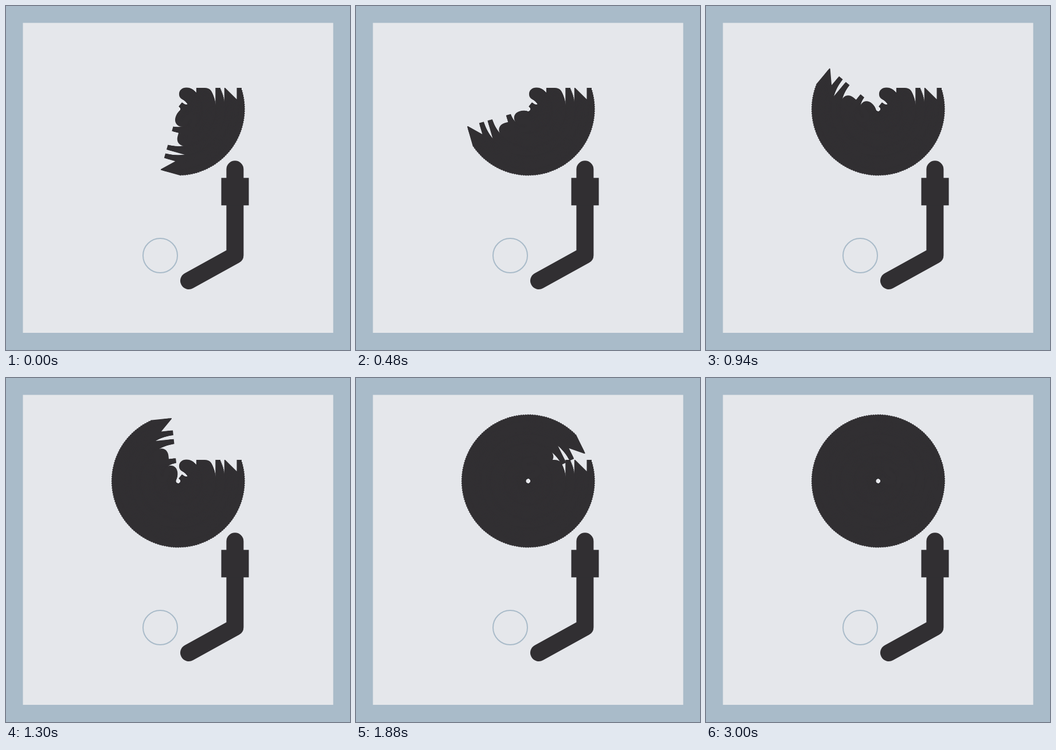
An HTML page with a canvas that plays this animation: 600 px wide and 601 px high, repeating every 3.3 s.

```html
<!DOCTYPE html>
<html lang="en">
<head>
<meta charset="utf-8">
<title>Spin</title>
<style>
  html, body { margin: 0; width: 100%; height: 100%; overflow: hidden; background: #a9bbc9; }
  canvas { display: block; }
</style>
</head>
<body>
<canvas id="stage" width="600" height="601"></canvas>
<script>
const ctx = document.getElementById('stage').getContext('2d');
const LOOP = 3300;
const BLUE = '#a9bbc9', PANEL = '#e5e7eb', INK = '#312f32';
const TICK = 30.3;            // ms between visible updates
const STEP = Math.PI / 90;    // angle between printed copies
const FIRST_COPIES = 53;

// The word SPIN, with its pivot at the left end of the baseline.
const word = new Path2D([
  'M1 -4.5L6.4 -11.6C9.5 -9 12 -7.9 15 -7.9C17.6 -7.9 19.2 -9 19.2 -10.8',
  'C19.2 -12.9 17.7 -13.7 12.8 -15C6.5 -16.7 1.6 -19 1.6 -26',
  'C1.6 -33 7 -37.5 14.3 -37.5C19 -37.5 23.2 -36 26.5 -33.3',
  'L21.6 -26.4C18.8 -28.4 16.3 -29.4 14 -29.4C11.6 -29.4 10.4 -28.3 10.4 -26.8',
  'C10.4 -24.6 12 -23.9 17.2 -22.6C24.2 -20.8 28.3 -17.8 28.3 -11.6',
  'C28.3 -4 22.8 .5 15 .5C9.7 .5 4.7 -1.2 1 -4.5Z',
  'M31.6 0V-37H46.5C54.8 -37 59.5 -32 59.5 -24.8C59.5 -16.6 53.4 -12.2 45.8 -12.2H40V0Z',
  'M40 -19.5V-29.5H45.8C49 -29.5 51 -27.8 51 -24.5C51 -21.5 49 -19.5 46 -19.5Z',
  'M65 0V-37H73.7V0Z',
  'M80.5 0V-37H82L102.2 -17V-37H110.7V0H109.2L89 -20.3V0Z'
].join(''));

// Same shape as the bowl opening, wound oppositely via the even-odd rule.
function drawRecord(copies) {
  ctx.fillStyle = INK;
  for (let i = 0; i <= copies; i++) {
    ctx.save();
    ctx.translate(300.3, 180);
    ctx.rotate(i * STEP);
    ctx.fill(word, 'evenodd');
    ctx.restore();
  }
}

function drawDeck() {
  ctx.fillStyle = BLUE;
  ctx.fillRect(0, 0, 600, 601);
  ctx.fillStyle = PANEL;
  ctx.fillRect(29.5, 29.5, 541.2, 541.5);

  ctx.strokeStyle = BLUE;
  ctx.lineWidth = 2;
  ctx.beginPath();
  ctx.arc(269, 436, 30, 0, Math.PI * 2);
  ctx.stroke();

  ctx.strokeStyle = ctx.fillStyle = INK;
  ctx.lineWidth = 30;
  ctx.lineCap = ctx.lineJoin = 'round';
  ctx.beginPath();
  ctx.moveTo(399.4, 285.3);
  ctx.lineTo(399.4, 435.5);
  ctx.lineTo(319, 480);
  ctx.stroke();
  ctx.fillRect(375.5, 300.3, 48, 48);
}

function render(now) {
  const tick = Math.floor((now % LOOP) / TICK + 0.2);
  drawDeck();
  drawRecord(Math.min(190, FIRST_COPIES + Math.round(tick * 1.833)));
}

const start = performance.now();
function frame() {
  render(performance.now() - start);
  requestAnimationFrame(frame);
}
frame();
</script>
</body>
</html>
```
